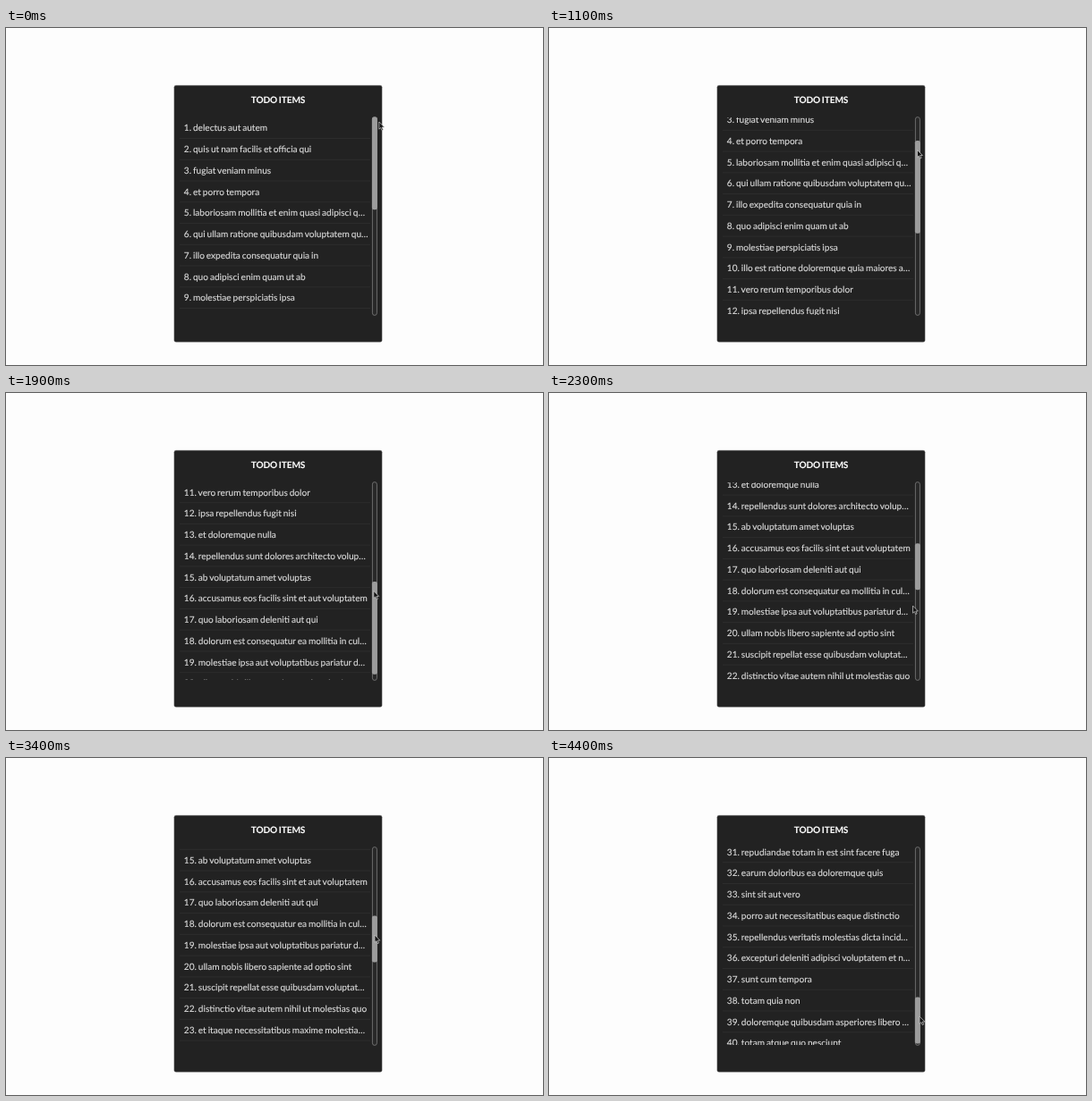
Recreate the animation shown at these times as an HTML page. Size 600 by 377 pixels, loop 4500 ms.

```html
<!DOCTYPE html>
<html lang="en">
<head>
<meta charset="utf-8">
<title>Todo items</title>
<style>
  html, body { margin: 0; width: 100%; height: 100%; overflow: hidden; background: #fdfdfd; }
  svg { display: block; width: 600px; height: 377px; }
  text {
    font-family: Lato, "Open Sans", sans-serif; font-size: 10.1px; word-spacing: -.65px;
    fill: #dedede; stroke: #dedede; stroke-width: .12; text-rendering: geometricPrecision;
  }
  .title { font-weight: 700; letter-spacing: -.1px; fill: #fff; stroke: #fff; text-anchor: middle; }
  .panel { fill: #222; stroke: #666; stroke-opacity: .5; stroke-width: .8; }
  .rule { stroke: #303030; stroke-width: .75; }
  .track { fill: #282828; stroke: #747474; stroke-width: .9; }
  .thumb { fill: #9c9c9c; }
  .pointer { fill: #151515; stroke: #d0d0d0; stroke-width: .7; stroke-linejoin: round; }
</style>
</head>
<body>
<svg viewBox="0 0 600 377">
  <clipPath id="view"><rect x="190" y="100.2" width="218" height="220.8"/></clipPath>
  <rect class="panel" x="187.9" y="64.2" width="232.2" height="287" rx="2"/>
  <text class="title" x="304" y="84.3">TODO ITEMS</text>
  <g clip-path="url(#view)"><g id="list"></g></g>
  <rect class="track" x="409.4" y="99.6" width="5" height="221.8" rx="2.5"/>
  <rect class="thumb" id="thumb" x="408.9" width="6" rx="2.2"/>
  <path class="pointer" id="pointer" d="M0 0V8.2L1.9 6.5L3.2 9.5L4.6 8.9L3.3 6H5.9Z"/>
</svg>
<script>
const LOOP = 4500, STEP = 100;
const TOP = 99.5, VIEW = 222, ROW = 23.75, PAGE = 20;
const GRAB = 600, LOAD = 2100, RELEASE = 2400, REGRAB = 3300;

const titles = `delectus aut autem
quis ut nam facilis et officia qui
fugiat veniam minus
et porro tempora
laboriosam mollitia et enim quasi adipisci q…
qui ullam ratione quibusdam voluptatem qu…
illo expedita consequatur quia in
quo adipisci enim quam ut ab
molestiae perspiciatis ipsa
illo est ratione doloremque quia maiores a…
vero rerum temporibus dolor
ipsa repellendus fugit nisi
et doloremque nulla
repellendus sunt dolores architecto volup…
ab voluptatum amet voluptas
accusamus eos facilis sint et aut voluptatem
quo laboriosam deleniti aut qui
dolorum est consequatur ea mollitia in cul…
molestiae ipsa aut voluptatibus pariatur d…
ullam nobis libero sapiente ad optio sint
suscipit repellat esse quibusdam voluptat…
distinctio vitae autem nihil ut molestias quo
et itaque necessitatibus maxime molestia…
adipisci non ad dicta qui amet quaerat dol…
voluptas quo tenetur perspiciatis explicab…
aliquam aut quasi
veritatis pariatur delectus
nesciunt totam sit blanditiis sit
laborum aut in quam
nemo perspiciatis repellat ut dolor libero c…
repudiandae totam in est sint facere fuga
earum doloribus ea doloremque quis
sint sit aut vero
porro aut necessitatibus eaque distinctio
repellendus veritatis molestias dicta incid…
excepturi deleniti adipisci voluptatem et n…
sunt cum tempora
totam quia non
doloremque quibusdam asperiores libero …
totam atque quo nesciunt`.split("\n");

// Key points of the pointer: time, x, y
const path = [
  [0, 416.8, 105], [GRAB, 411.5, 110], [1100, 411.5, 136.5], [1900, 410.8, 221.4],
  [2300, 406.5, 238], [RELEASE, 406, 238], [3000, 411, 190], [REGRAB, 411.5, 190],
  [3400, 412, 198.1], [3800, 415.5, 224.1], [4400, 414, 289.1]
];

const $ = id => document.getElementById(id);

function add(tag, attrs, text = "") {
  const el = document.createElementNS("http://www.w3.org/2000/svg", tag);
  for (const name in attrs) el.setAttribute(name, attrs[name]);
  el.textContent = text;
  $("list").append(el);
}

titles.forEach((title, i) => {
  const y = TOP + .5 + i * ROW, line = y + ROW - .2;
  add("text", { x: 198.8, y: y + 15.4 }, `${i + 1}. ${title}`);
  add("line", { class: "rule", x1: 194, x2: 407, y1: line, y2: line });
});

function pointerAt(t) {
  const i = Math.max(1, path.findIndex(p => p[0] >= t));
  const [t0, x0, y0] = path[i - 1], [t1, x1, y1] = path[i];
  const k = (t - t0) / (t1 - t0);
  return [x0 + (x1 - x0) * k, y0 + (y1 - y0) * k];
}

// Dragging moves the thumb with the pointer; loading a second page halves the thumb.
function thumbAt(t, y) {
  if (t <= GRAB) return 0;
  if (t < LOAD) return Math.min(y - 110, VIEW - VIEW * VIEW / (ROW * PAGE));
  if (t <= RELEASE) return y - 169.2;
  return t <= REGRAB ? 68.8 : y - 121;
}

function draw(now) {
  const t = Math.floor(now % LOOP / STEP) * STEP;
  const total = ROW * PAGE * (t < LOAD ? 1 : 2);
  const [x, y] = pointerAt(t);
  const thumb = thumbAt(t, y);
  $("list").setAttribute("transform", `translate(0 ${-thumb * total / VIEW})`);
  $("thumb").setAttribute("y", TOP + thumb);
  $("thumb").setAttribute("height", VIEW * VIEW / total);
  $("pointer").setAttribute("transform", `translate(${x} ${y})`);
}

const start = performance.now();
function tick() {
  draw(performance.now() - start);
  requestAnimationFrame(tick);
}
tick();
</script>
</body>
</html>
```
